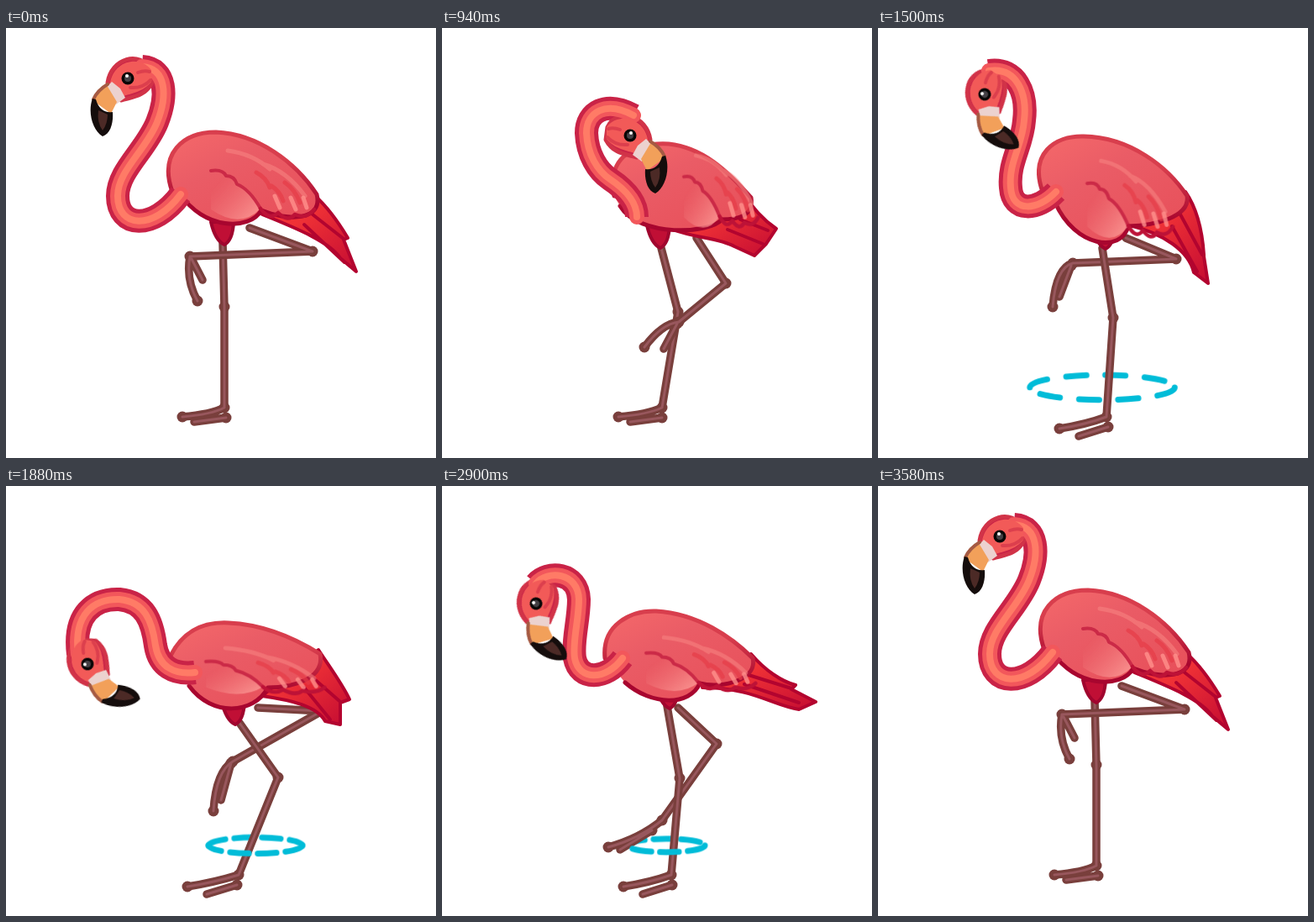
Write an HTML page without scripts that moves like this. It is 512 px wide and 512 px high and loops after 3600 ms.

```html
<!DOCTYPE html>
<html lang="en">
<head>
<meta charset="utf-8">
<title>Wading flamingo</title>
<style>
html, body { margin: 0; width: 100%; height: 100%; overflow: hidden; background: #fff; }
svg { display: block; width: 100vw; height: 100vh; }
path { stroke-linecap: round; stroke-linejoin: round; fill: none; }
.neck, .head, .body, .tail, .wing, .tuft, .near, .far { animation: 3.6s ease-in-out infinite; }
.neck { animation-name: neck; }
.head { animation-name: head; }
.body { animation-name: body; }
.tail { animation-name: tail; }
.wing { animation-name: wing; }
.tuft { animation-name: tuft; }
.near { animation-name: near; }
.far { animation-name: far; }

.bone { stroke: #793f3c; stroke-width: 9.5; marker-mid: url(#joint); }
.sheen { stroke: #98575d; stroke-width: 3; }
.neck.line { stroke: #c92347; stroke-width: 28; stroke-linecap: butt; }
.neck.skin { stroke: #f2575b; stroke-width: 18; }
.neck.glow { stroke: #ff7b66; stroke-width: 8; }
.wing path { vector-effect: non-scaling-stroke; }

.ripple { animation: spread 3.6s linear infinite; animation-delay: var(--at); }
.ripple path { stroke: #00bcd8; stroke-width: 7; vector-effect: non-scaling-stroke; animation: gaps 3.6s linear infinite; animation-delay: var(--at); }
@keyframes spread {
  0% { transform: translate(var(--x), 428px) scale(.1); opacity: 1; }
  5% { transform: translate(var(--x), 428px) scale(.58); }
  9% { transform: translate(var(--x), 428px) scale(1); }
  11.6% { transform: translate(var(--x), 428px) scale(1.1); opacity: 1; }
  11.7%, 100% { transform: translate(var(--x), 428px) scale(1.1); opacity: 0; }
}
@keyframes gaps {
  0% { stroke-dasharray: 24 8; }
  6% { stroke-dasharray: 22 11; }
  9% { stroke-dasharray: 24 23; }
  11.6%, 100% { stroke-dasharray: 4 40; }
}

@keyframes neck {
  0%, 5.5%, 36.7%, 90%, 100% { d: path("M162,46C192,48 192,82 180,112C167,145 133,170 133,200C133,238 175,242 208,198"); }
  19%, 28.9% { d: path("M228,104C195,86 172,100 172,125C173,150 185,170 200,180C215,190 232,205 232,225"); }
  41.7% { d: path("M132,51C165,46 178,78 174,110C172,140 155,160 158,190C160,220 190,218 212,195"); }
  49.5%, 52.8% { d: path("M86,200C80,152 105,134 135,135C165,138 174,160 178,190C182,215 200,225 225,222"); }
  64%, 69% { d: path("M79,204C75,152 105,133 130,134C160,137 170,160 177,185C182,210 200,222 225,222"); }
  80.6% { d: path("M112,116C125,100 162,102 163,135C163,160 155,185 158,205C163,232 195,232 215,205"); }
}
@keyframes head {
  0%, 5.5%, 36.7%, 90%, 100% { transform: translate(145px,60px) rotate(0deg) scale(1,1); }
  19%, 28.9% { transform: translate(224px,128px) rotate(0deg) scale(-1,1); }
  41.7% { transform: translate(127px,79px) rotate(-56deg) scale(1,1); }
  49.5%, 52.8% { transform: translate(97px,212px) rotate(-80deg) scale(1,1); }
  64%, 69% { transform: translate(103px,214px) rotate(-131deg) scale(1,1); }
  80.6% { transform: translate(112px,140px) rotate(-52deg) scale(1,1); }
}
@keyframes body {
  0%, 5.5%, 90%, 100% { d: path("M198,195C182,150 210,124 250,124C300,126 345,160 370,198C378,230 335,230 304,217C290,242 235,240 207,197"); }
  19%, 28.9% { d: path("M205,200C195,150 235,136 270,138C310,142 340,170 368,202C372,225 350,228 333,228C320,245 235,250 212,212"); }
  37%, 41.7% { d: path("M196,195C180,150 210,128 245,129C300,130 345,165 368,200C372,225 330,235 298,236C290,268 235,262 211,208"); }
  49.5%, 52.8% { d: path("M196,202C215,165 245,162 265,163C310,165 350,185 374,200C380,230 340,240 312,240C295,272 245,275 218,238"); }
  64%, 69% { d: path("M196,202C215,162 245,157 265,157C310,157 350,175 374,194C380,222 340,236 312,232C295,268 245,272 218,236"); }
  80.6% { d: path("M194,205C190,165 225,148 255,149C305,152 345,180 370,205C376,230 335,242 307,235C295,262 250,262 218,234"); }
}
@keyframes tail {
  0%, 5.5%, 90%, 100% { d: path("M368,200C385,215 398,235 407,250L402,252L417,290L398,274C385,255 350,240 305,222ZM365,222L402,251M355,234L403,279"); }
  19%, 28.9% { d: path("M360,198C370,215 385,230 398,239L386,257L372,271L348,260C330,250 300,250 275,240ZM355,228L388,241M340,240L382,257"); }
  37%, 41.7% { d: path("M366,195C380,215 386,240 388,270L388,272L393,304L376,291C370,265 340,245 300,235ZM360,222L386,270M350,236L380,290"); }
  49.5%, 52.8% { d: path("M372,195C385,215 400,235 409,254L398,258L398,284L380,280C370,262 340,255 305,250ZM365,228L397,256M355,240L386,278"); }
  64%, 69% { d: path("M372,195C395,210 415,235 432,274L418,262L414,268L395,255C375,245 340,243 310,240ZM370,220L416,260M355,235L400,252"); }
  80.6% { d: path("M368,200C385,220 405,233 421,237L416,242L445,257L425,266C395,262 370,240 310,240ZM365,225L416,241M360,236L425,258"); }
}
@keyframes wing {
  0%, 5.5%, 90%, 100% { transform: translate(244px,170px) scale(1,1); }
  19%, 28.9% { transform: translate(288px,177px) scale(.72,1.05); }
  37%, 41.7% { transform: translate(249px,185px) scale(.83,1.12); }
  49.5%, 52.8% { transform: translate(238px,209px) scale(1.15,.67); }
  64%, 69% { transform: translate(238px,207px) scale(1.17,.58); }
  80.6% { transform: translate(243px,199px) scale(1.06,.78); }
}
@keyframes tuft {
  0%, 5.5%, 90%, 100% { transform: translate(257px,235px); }
  19%, 28.9% { transform: translate(257px,239px); }
  37%, 41.7% { transform: translate(268px,240px); }
  49.5%, 52.8% { transform: translate(270px,261px); }
  64%, 69% { transform: translate(269px,256px); }
  80.6% { transform: translate(268px,242px); }
}
@keyframes near {
  0%, 5.5%, 90%, 100% { d: path("M290,238L365,266L219,272Q214,300 228,325M221,275L234,300"); }
  19%, 28.9% { d: path("M303,250L338,304L282,350Q262,352 241,380M280,352L264,382"); }
  33.5% { d: path("M285,258L300,340L272,463Q248,472 216,477M274,475L239,486"); }
  37%, 41.7% { d: path("M267,262L280,345L272,463Q248,472 216,477M274,475L239,486"); }
  49.5%, 52.8% { d: path("M278,282L324,347L277,463Q248,472 216,477M275,475L239,486"); }
  64%, 69% { d: path("M277,277L319,346L277,463Q248,472 216,477M275,475L239,486"); }
  80.6%, 83.5% { d: path("M268,262L283,348L273,463Q248,472 216,477M274,475L239,486"); }
}
@keyframes far {
  0%, 5.5%, 90%, 100% { d: path("M258,255L260,332L260,452Q245,460 210,463M262,464L224,469"); }
  19%, 32% { d: path("M261,262L281,338L262,452Q245,460 210,463M262,464L224,469"); }
  40%, 41.7% { d: path("M295,250L355,275L232,280Q212,285 208,332M230,283L216,320"); }
  49.5%, 52.8% { d: path("M300,264L376,268L270,328Q250,340 247,387M268,330L256,374"); }
  64%, 69% { d: path("M300,258L374,270L260,324Q243,340 241,381M258,328L250,368"); }
  80.6% { d: path("M281,264L327,307L262,398Q235,420 198,430M250,410L212,433"); }
  84% { d: path("M272,260L282,335L260,452Q245,460 210,463M262,464L224,469"); }
}
</style>
</head>
<body>
<svg viewBox="0 0 512 512">
  <defs>
    <linearGradient id="plumage" x2=".8" y2="1">
      <stop offset="0" stop-color="#f5696a"/>
      <stop offset=".4" stop-color="#ea5c66"/>
      <stop offset="1" stop-color="#e8505a"/>
    </linearGradient>
    <linearGradient id="rim" x2="0" y2="1">
      <stop offset=".3" stop-color="#d83e4d"/>
      <stop offset=".8" stop-color="#a8062f"/>
    </linearGradient>
    <linearGradient id="quills" x2="1" y2="1">
      <stop offset=".35" stop-color="#f03236"/>
      <stop offset="1" stop-color="#c40c32"/>
    </linearGradient>
    <linearGradient id="lobe" x2="1" y2="1">
      <stop offset=".2" stop-color="#f27a7c" stop-opacity="0"/>
      <stop offset="1" stop-color="#fb9a96"/>
    </linearGradient>
    <marker id="joint" markerUnits="userSpaceOnUse" markerWidth="14" markerHeight="14" refX="7" refY="7">
      <circle cx="7" cy="7" r="6.5" fill="#793f3c"/>
    </marker>
  </defs>

  <!-- far half of the ripples -->
  <g class="ripple" style="--x:267px;--at:-2.42s"><path d="M-87,0A87,15 0 0 1 87,0"/></g>
  <g class="ripple" style="--x:297px;--at:-1.92s"><path d="M-87,0A87,15 0 0 1 87,0"/></g>
  <g class="ripple" style="--x:295px;--at:-1.42s"><path d="M-87,0A87,15 0 0 1 87,0"/></g>
  <g class="ripple" style="--x:267px;--at:-.86s"><path d="M-87,0A87,15 0 0 1 87,0"/></g>

  <path class="far bone"/><path class="far sheen"/>
  <path class="near bone"/><path class="near sheen"/>

  <!-- near half of the ripples -->
  <g class="ripple" style="--x:267px;--at:-2.42s"><path d="M87,0A87,15 0 0 1 -87,0"/></g>
  <g class="ripple" style="--x:297px;--at:-1.92s"><path d="M87,0A87,15 0 0 1 -87,0"/></g>
  <g class="ripple" style="--x:295px;--at:-1.42s"><path d="M87,0A87,15 0 0 1 -87,0"/></g>
  <g class="ripple" style="--x:267px;--at:-.86s"><path d="M87,0A87,15 0 0 1 -87,0"/></g>

  <path class="tuft" d="M-13,-4Q-8,18 3,23Q13,18 14,-4Z" style="fill:#c00f35;stroke:#a0052e;stroke-width:4"/>
  <path class="tail" style="fill:url(#quills);stroke:#b3042f;stroke-width:4"/>
  <path class="body" style="fill:url(#plumage);stroke:url(#rim);stroke-width:5"/>

  <g class="wing">
    <path d="M0,0Q14,-2 18,6Q28,6 31,16Q46,22 59,45Q35,70 0,46Z" style="fill:url(#lobe)"/>
    <path d="M20,-24Q50,-20 70,-2M62,-8Q90,0 112,30" style="stroke:#f78380;stroke-width:5;opacity:.6"/>
    <path d="M54,2Q66,8 70,20M72,18Q82,24 86,36M88,14Q100,22 106,38" style="stroke:#e63c48;stroke-width:5;opacity:.7"/>
    <path d="M76,30L82,44M95,32L101,46M110,32L114,44" style="stroke:#ff918c;stroke-width:5;opacity:.8"/>
    <path d="M0,0Q14,-2 18,6Q28,6 31,16Q46,22 59,45" style="stroke:#cb2a47;stroke-width:4"/>
    <path d="M59,45Q70,60 80,50Q92,62 100,52Q114,58 123,46" style="stroke:#bd1237;stroke-width:4.5"/>
  </g>

  <path class="neck line"/>
  <g class="head">
    <path d="M27,-10C15,-34 -20,-24 -24,5L-8,26C5,22 20,22 29,5Z" style="fill:#c92347;stroke:#d13348;stroke-width:5"/>
  </g>
  <path class="neck skin"/>
  <path class="neck glow"/>
  <g class="head">
    <path d="M28,-10C15,-28 -16,-22 -21,5L-7,22C5,17 18,17 28,4Z" style="fill:#f25a58"/>
    <path d="M3,11Q18,12 27,2M12,-7Q20,-10 26,-8" style="stroke:#dc3f4d;stroke-width:4"/>
    <path d="M-19,4L-9,12L-3,23L-14,31L-27,12Z" style="fill:#ecd2cf"/>
    <path d="M-25,8Q-36,14 -42,26L-20,42L-13,28Z" style="fill:#f2a05a"/>
    <path d="M-24,7Q-36,14 -41,25" style="stroke:#a55a43;stroke-width:4"/>
    <path d="M-42,24C-48,40 -42,62 -30,69C-20,66 -17,52 -18,40Q-33,42 -38,25Z" style="fill:#150d0c"/>
    <path d="M-35,38Q-37,52 -30,62Q-24,54 -24,43Z" style="fill:#4c2a26"/>
    <circle r="7.5" fill="#080606"/>
    <circle r="4" fill="#454045"/>
    <circle cx="-1" cy="-3" r="2" fill="#fff"/>
  </g>
</svg>
</body>
</html>
```
